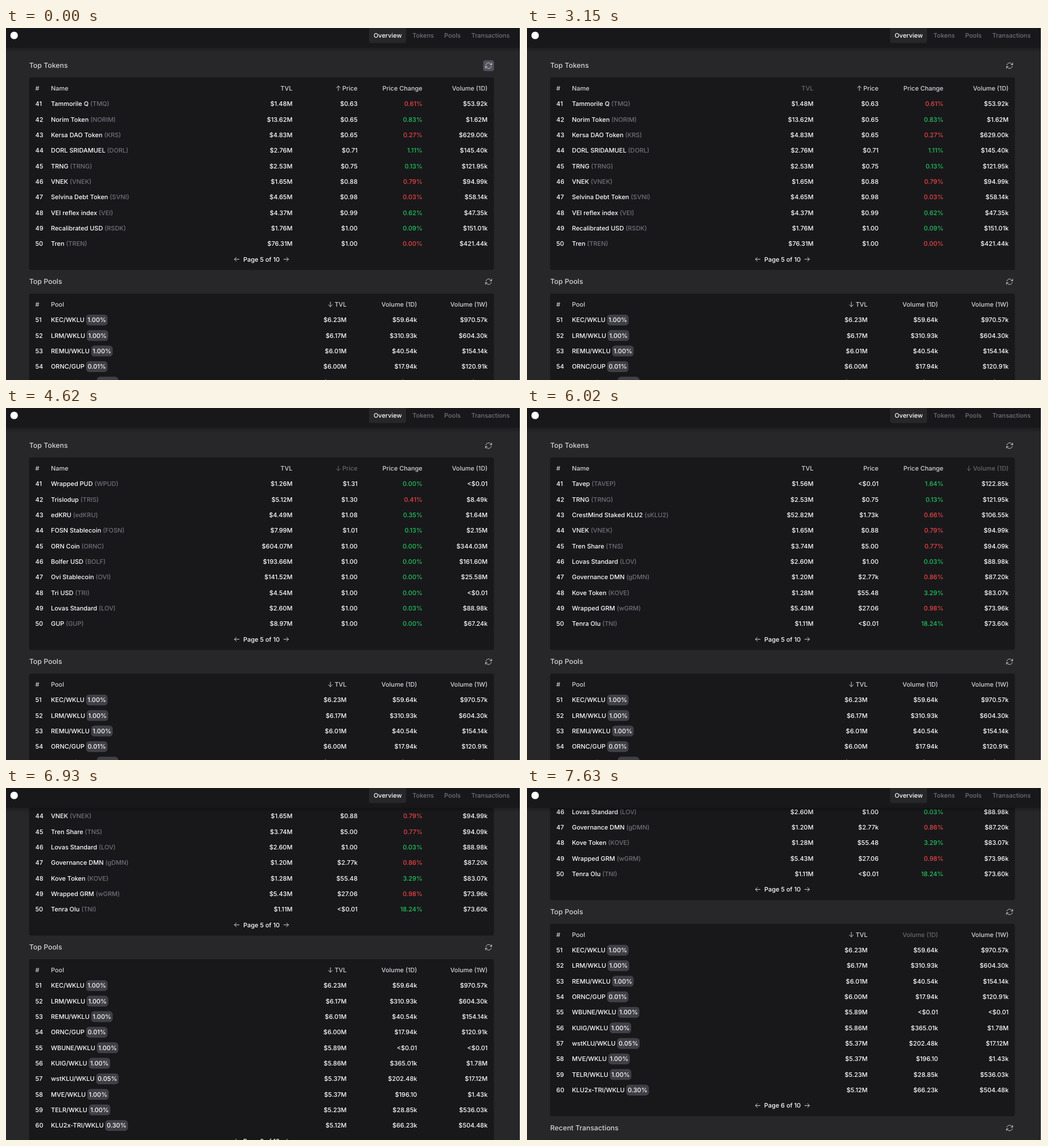
Write an HTML page that moves like this. It is 905 px wide and 619 px high and loops after 8000 ms.

```html
<!DOCTYPE html>
<html lang="en">
<head>
<meta charset="utf-8">
<title>Token overview</title>
<style>
  html, body { margin: 0; width: 100%; height: 100%; overflow: hidden; background: #27272a; }
  svg { display: block; }
  text { font: 500 10.93px Inter, Roboto, sans-serif; fill: #fff; white-space: pre; text-rendering: geometricPrecision; }
  .title { font-size: 12.3px; fill: #d4d4d8; }
  .head { fill: #d4d4d8; }
  .muted { fill: #71717a; }
  .up { fill: #22c55e; }
  .down { fill: #ef4444; }
  .icon { fill: none; stroke: #d4d4d8; stroke-linecap: round; stroke-linejoin: round; }
</style>
</head>
<body>
<svg id="stage" width="905" height="619" viewBox="0 0 905 619">
  <defs>
    <linearGradient id="shade" x2="0" y2="1">
      <stop stop-color="#000" stop-opacity=".22"/>
      <stop offset="1" stop-color="#000" stop-opacity="0"/>
    </linearGradient>
  </defs>
  <rect width="905" height="619" fill="#27272a"/>
  <g id="page"></g>
  <rect y="35" width="903" height="9" fill="url(#shade)"/>
  <g id="nav">
    <rect width="903" height="35" fill="#18181b"/>
    <circle cx="14.3" cy="13" r="6.6" fill="#fff"/>
    <rect x="638" y="-4" width="65" height="30.5" rx="4" fill="#27272a"/>
  </g>
  <rect x="903" width="2" height="619" fill="#fff"/>
</svg>
<script>
const LOOP = 8000, PITCH = 27.335, POOLS_Y = 380;

// name | symbol | TVL | price | signed change | volume
const TOKENS = `
Tammorile Q|TMQ|$1.48M|$0.63|-0.61%|$53.92k
Norim Token|NORIM|$13.62M|$0.65|+0.83%|$1.62M
Kersa DAO Token|KRS|$4.83M|$0.65|-0.27%|$629.00k
DORL SRIDAMUEL|DORL|$2.76M|$0.71|+1.11%|$145.40k
TRNG|TRNG|$2.53M|$0.75|+0.13%|$121.95k
VNEK|VNEK|$1.65M|$0.88|-0.79%|$94.99k
Selvina Debt Token|SVNI|$4.65M|$0.98|-0.03%|$58.14k
VEI reflex index|VEI|$4.37M|$0.99|+0.62%|$47.35k
Recalibrated USD|RSDK|$1.76M|$1.00|+0.09%|$151.01k
Tren|TREN|$76.31M|$1.00|-0.00%|$421.44k
Wrapped PUD|WPUD|$1.26M|$1.31|+0.00%|<$0.01
Trislodup|TRIS|$5.12M|$1.30|-0.41%|$8.49k
edKRU|edKRU|$4.49M|$1.08|+0.35%|$1.64M
FOSN Stablecoin|FOSN|$7.99M|$1.01|+0.13%|$2.15M
ORN Coin|ORNC|$604.07M|$1.00|+0.00%|$344.03M
Bolfer USD|BOLF|$193.66M|$1.00|+0.00%|$161.60M
Ovi Stablecoin|OVI|$141.52M|$1.00|+0.00%|$25.58M
Tri USD|TRI|$4.54M|$1.00|+0.00%|<$0.01
Lovas Standard|LOV|$2.60M|$1.00|+0.03%|$88.98k
GUP|GUP|$8.97M|$1.00|+0.00%|$67.24k
Tavep|TAVEP|$1.56M|<$0.01|+1.64%|$122.85k
CrestMind Staked KLU2|sKLU2|$52.82M|$1.73k|-0.66%|$106.55k
Tren Share|TNS|$3.74M|$5.00|-0.77%|$94.09k
Governance DMN|gDMN|$1.20M|$2.77k|-0.86%|$87.20k
Kove Token|KOVE|$1.28M|$55.48|+3.29%|$83.07k
Wrapped GRM|wGRM|$5.43M|$27.06|-0.98%|$73.96k
Tenra Olu|TNI|$1.11M|<$0.01|+18.24%|$73.60k`;

// pair | fee | TVL | volume 1D | volume 1W
const POOLS = `
KEC/WKLU|1.00%|$6.23M|$59.64k|$970.57k
LRM/WKLU|1.00%|$6.17M|$310.93k|$604.30k
REMU/WKLU|1.00%|$6.01M|$40.54k|$154.14k
ORNC/GUP|0.01%|$6.00M|$17.94k|$120.91k
WBUNE/WKLU|1.00%|$5.89M|<$0.01|<$0.01
KUIG/WKLU|1.00%|$5.86M|$365.01k|$1.78M
wstKLU/WKLU|0.05%|$5.37M|$202.48k|$17.12M
MVE/WKLU|1.00%|$5.37M|$196.10|$1.43k
TELR/WKLU|1.00%|$5.23M|$28.85k|$536.03k
KLU2x-TRI/WKLU|0.30%|$5.12M|$66.23k|$504.48k`;

// Each view: sorted column, arrow direction, rows in order
const VIEWS = {
  priceUp: ['Price', 'up', 'TMQ NORIM KRS DORL TRNG VNEK SVNI VEI RSDK TREN'],
  priceDown: ['Price', 'down', 'WPUD TRIS edKRU FOSN ORNC BOLF OVI TRI LOV GUP'],
  tvl: ['TVL', 'down', 'wGRM TRIS KRS SVNI TRI edKRU VEI TNS DORL LOV'],
  change: ['Price Change', 'down', 'FOSN TRNG RSDK LOV ORNC BOLF OVI TRI GUP WPUD'],
  volume: ['Volume (1D)', 'down', 'TAVEP TRNG sKLU2 VNEK TNS LOV gDMN KOVE wGRM TNI'],
};

// Column label, right edge, left edge of the label
const TOKEN_COLUMNS = [['TVL', 503.4, 483], ['Price', 617.8, 592], ['Price Change', 731.8, 663], ['Volume (1D)', 846.3, 784.5]];
const POOL_COLUMNS = [['TVL', 598.5, 578], ['Volume (1D)', 722.4, 660], ['Volume (1W)', 846.3, 782]];

// Time, view, hovered element
const STATES = [
  [0, 'priceUp', 'refresh'], [350, 'priceUp', ''], [2310, 'priceUp', 'TVL'],
  [3220, 'tvl', 'TVL'], [3570, 'tvl', ''], [3640, 'tvl', 'Price'],
  [4200, 'priceDown', 'Price'], [4690, 'priceDown', 'Price Change'],
  [5320, 'change', 'Price Change'], [5530, 'change', 'Volume (1D)'],
  [6020, 'volume', 'Volume (1D)'], [6510, 'volume', ''],
  [6790, 'volume', 'row'], [6860, 'volume', ''], [7420, 'volume', 'pool'],
];
const SCROLL = [[0, 0], [6720, 12], [6790, 43.7], [6860, 106], [6930, 166],
  [7070, 218], [7140, 224], [7210, 227], [7280, 228.3]];

const ARROWS = { left: 0, up: 90, right: 180, down: 270 };
const page = document.getElementById('page');
const nav = document.getElementById('nav');

function add(parent, tag, attributes = {}, content = '') {
  const node = document.createElementNS('http://www.w3.org/2000/svg', tag);
  for (const key in attributes) node.setAttribute(key, attributes[key]);
  node.textContent = content;
  return parent.appendChild(node);
}
const label = (parent, x, y, content, style = '', anchor = 'start') =>
  add(parent, 'text', { x, y, class: style, 'text-anchor': anchor }, content);
const rightLabel = (parent, x, y, content, style) => label(parent, x, y, content, style, 'end');
const arrow = (parent, x, y, direction) => add(parent, 'path', {
  class: 'icon', d: 'M-.7-3.4-4.1 0-.7 3.4M-4.1 0H4.1',
  transform: `translate(${x} ${y}) rotate(${ARROWS[direction]})`,
});
const baseline = index => 110 + PITCH * index;
const parse = table => table.trim().split('\n').map(line => line.split('|'));
const latest = (steps, time) => steps.filter(step => step[0] <= time).pop();

function section(y, title) {
  const group = add(page, 'g', { transform: `translate(0 ${y})` });
  label(group, 40.8, 70.4, title, 'title');
  group.button = add(group, 'rect', { x: 838.6, y: 56.7, width: 19, height: 19, rx: 4, fill: 'none' });
  add(group, 'path', {
    class: 'icon', 'stroke-width': 1.6, transform: 'translate(840.9 59) scale(.6)',
    d: 'M16 9.35h5V4.36M3 19.64v-5h5M3 14.65l3.17 3.18a8.25 8.25 0 0 0 13.8-3.7M4.03 9.87a8.25 8.25 0 0 1 13.8-3.7L21 9.35',
  });
  add(group, 'rect', { x: 40.5, y: 87, width: 817, height: 338.5, rx: 4, fill: '#18181b' });
  return group;
}

function tableFrame(group, nameLabel, columns, pageNumber) {
  label(group, 51.5, 110, '#', 'head');
  label(group, 79, 110, nameLabel, 'head');
  const heads = {};
  for (const [name, right] of columns) heads[name] = rightLabel(group, right, 110, name, 'head');
  arrow(group, 405.5, 406.7, 'left');
  arrow(group, 492.3, 406.7, 'right');
  label(group, 449, baseline(11), `Page ${pageNumber} of 10`, '', 'middle');
  return heads;
}

function sortArrow(parent, columns, name, direction) {
  const start = columns.find(column => column[0] === name)[2];
  return arrow(parent, start - 8, 106, direction);
}

const tokenSection = section(0, 'Top Tokens');
const tokenHeads = tableFrame(tokenSection, 'Name', TOKEN_COLUMNS, 5);
const tokens = Object.fromEntries(parse(TOKENS).map(token => [token[1], token]));
const views = {};
for (const [key, [sorted, direction, order]] of Object.entries(VIEWS)) {
  const group = views[key] = add(tokenSection, 'g');
  group.sorted = sorted;
  group.arrow = sortArrow(group, TOKEN_COLUMNS, sorted, direction);
  group.rows = order.split(' ').map((id, i) => {
    const [name, symbol, ...values] = tokens[id];
    const row = add(group, 'g'), y = baseline(i + 1);
    label(row, 51.5, y, 41 + i);
    add(label(row, 79, y, name + ' '), 'tspan', { class: 'muted' }, `(${symbol})`);
    values.forEach((value, c) => {
      const style = { '+': 'up', '-': 'down' }[value[0]] || '';
      rightLabel(row, TOKEN_COLUMNS[c][1], y, style ? value.slice(1) : value, style);
    });
    return row;
  });
}

const poolSection = section(POOLS_Y, 'Top Pools');
const poolHeads = tableFrame(poolSection, 'Pool', POOL_COLUMNS, 6);
sortArrow(poolSection, POOL_COLUMNS, 'TVL', 'down');
parse(POOLS).forEach(([pair, fee, ...values], i) => {
  const y = baseline(i + 1);
  label(poolSection, 51.5, y, 51 + i);
  const x = 79 + label(poolSection, 79, y, pair).getComputedTextLength() + 2.7;
  const pill = add(poolSection, 'rect', { x, y: y - 13.4, height: 19, rx: 5.5, fill: '#3f3f46' });
  const feeWidth = label(poolSection, x + 2.7, y, fee).getComputedTextLength();
  pill.setAttribute('width', feeWidth + 5.4);
  values.forEach((value, c) => rightLabel(poolSection, POOL_COLUMNS[c][1], y, value));
});

section(POOLS_Y * 2, 'Recent Transactions');

label(nav, 646, 17.2, 'Overview');
label(nav, 714.3, 17.2, 'Tokens', 'muted');
label(nav, 770, 17.2, 'Pools', 'muted');
label(nav, 817.7, 17.2, 'Transactions', 'muted');

function draw(now) {
  const time = now % LOOP;
  const [, active, hover] = latest(STATES, time);
  const dim = (node, on, opacity = 0.42) => node.setAttribute('opacity', on ? opacity : 1);

  page.setAttribute('transform', `translate(0 ${-latest(SCROLL, time)[1]})`);
  tokenSection.button.setAttribute('fill', hover === 'refresh' ? '#52525b' : 'none');
  for (const key in views) views[key].setAttribute('display', key === active ? 'inline' : 'none');
  for (const name in tokenHeads) dim(tokenHeads[name], hover === name);
  dim(views[active].arrow, hover === views[active].sorted);
  dim(views.volume.rows[1], hover === 'row', 0.75);
  dim(poolHeads['Volume (1D)'], hover === 'pool');
  requestAnimationFrame(draw);
}
draw(0);
</script>
</body>
</html>
```
